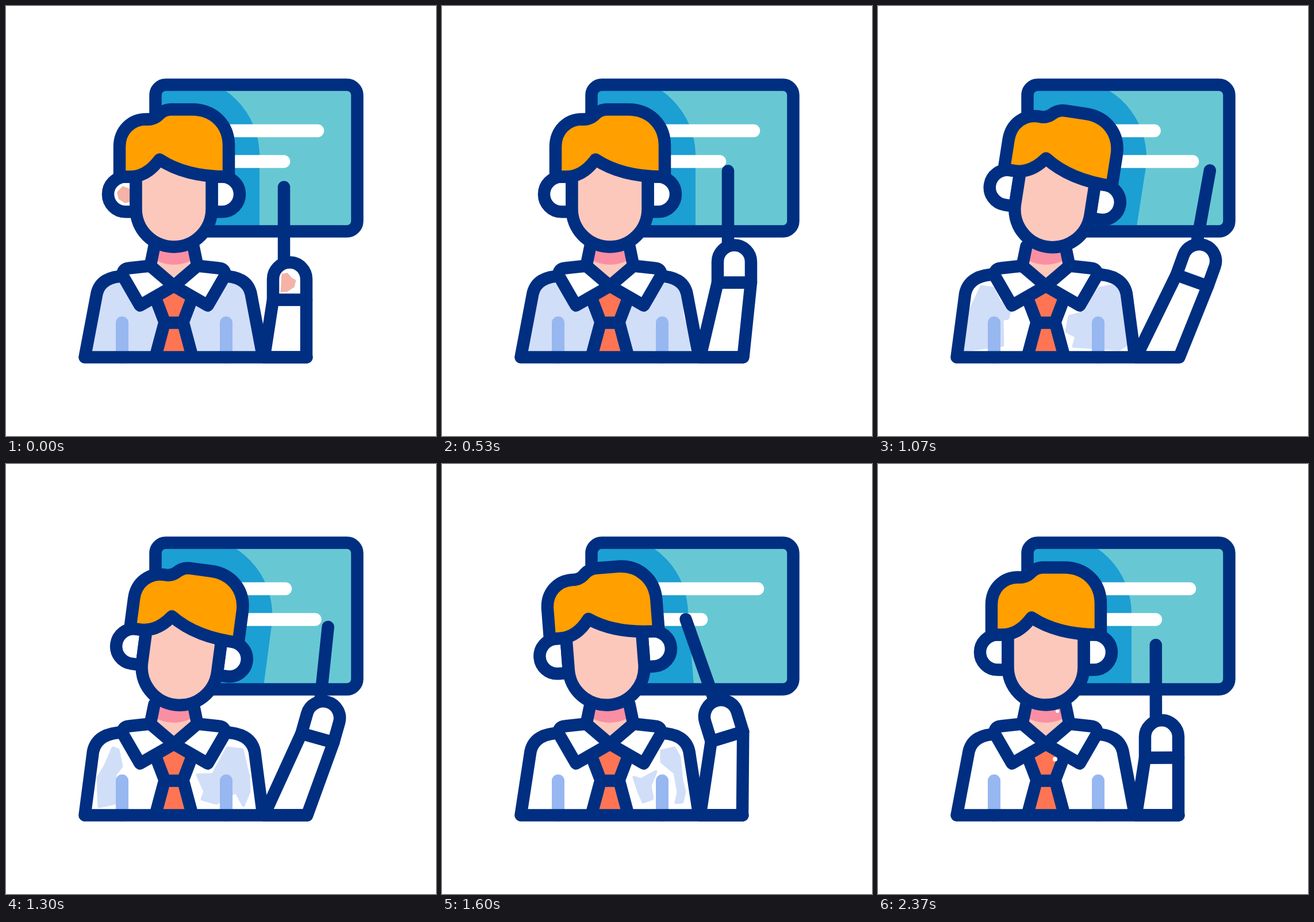
An HTML page that plays this animation: 748 by 748 pixels, repeating every 2.41 s.

```html
<!DOCTYPE html>
<html lang="en">
<head>
<meta charset="utf-8">
<title>Teacher at the board</title>
<style>
  html, body { margin: 0; width: 100%; height: 100%; overflow: hidden; background: #fff; }
  svg { display: block; width: 100vw; height: 100vh; }
  .ink { stroke: #002f81; stroke-width: 21.5; stroke-linecap: round; stroke-linejoin: round; fill: none; }
  .white { fill: #fff; }
  .skin { fill: #fdc8bc; }
  .hair { fill: #ff9f00; }
  .tie { fill: #ff7554; }
  .chalk { stroke: #fff; stroke-width: 22.5; stroke-linecap: round; }
  .fold { stroke: #97b7f1; stroke-width: 22; stroke-linecap: round; }
  #shirt { fill: #d1def8; stroke: #d1def8; stroke-width: 5; stroke-linejoin: round; }
  .blush { fill: #f4b3a6; }
</style>
</head>
<body>
<svg viewBox="0 0 748 748">
  <defs>
    <clipPath id="screen"><rect x="260" y="137" width="351" height="255"/></clipPath>
    <clipPath id="torso"><path d="M138 611L156 500Q164 470 207 470H377Q420 470 428 500L446 611Z"/></clipPath>
  </defs>

  <g id="board">
    <rect x="260" y="137" width="351" height="255" rx="18" fill="#67c8d4"/>
    <g clip-path="url(#screen)">
      <path class="sway" fill="#1c9fd3" d="M167 260A137 137 0 0 1 441 260V460H167Z"/>
    </g>
    <line id="row1" class="chalk" x1="310" y1="217" x2="542" y2="217"/>
    <line id="row2" class="chalk" x1="310" y1="270.5" x2="483" y2="270.5"/>
    <rect class="ink" x="260" y="137" width="351" height="255" rx="18"/>
  </g>

  <g id="arm">
    <line id="stick" class="ink"/>
    <path id="sleeve" class="ink white"/>
    <g id="hand">
      <path class="ink white" d="M-29 0V-36A29 29 0 0 1 29 -36V0Z"/>
      <path class="blush" d="M-14 -45L-4 -47L4 -38L11 -34L8 -22L-4 -14L-16 -13Z"/>
    </g>
  </g>

  <g id="body">
    <path class="skin" d="M268 400H316L326 455L292 475L258 455Z"/>
    <path fill="#fa8fa3" d="M266 415H318L322 443Q292 457 262 443Z"/>
    <path class="ink" d="M258 418L251 452M326 418L333 452"/>
    <g clip-path="url(#torso)"><path id="shirt"/></g>
    <path class="fold" d="M202 551V611M383 551V611"/>
    <path class="tie" d="M292 494L318 508L302 545H282L266 508ZM286 555H298L316 611H268Z"/>
    <path class="ink" d="M260 508L276 550L261 606M324 508L308 550L323 606M276 551H308"/>
    <path id="outline" class="ink"/>
    <path class="ink white" d="M203 469Q202 457 214 456L251 452L292 487L233 521ZM381 469Q382 457 370 456L333 452L292 487L351 521Z"/>
    <g id="specks" class="white"><circle cx="308" cy="513.5" r="4"/><circle cx="312" cy="430" r="3"/></g>
  </g>

  <g id="head" class="sway">
    <path class="ink white" d="M226 297H208A30.5 30.5 0 0 0 208 358H226ZM358 297H376A30.5 30.5 0 0 1 376 358H358Z"/>
    <path class="blush" d="M193 324L203 313L215 318V341L207 343L196 336Z"/>
    <path class="skin" d="M226 297L267 265L358 297V353A66 66 0 0 1 226 353Z"/>
    <path class="ink" d="M226 297V353A66 66 0 0 0 358 353V297"/>
    <path class="ink hair"
      d="M197.500 297V245C197.500 216 218 197 244 197Q256 198 264 191Q274 180 287 180H324C361 180 387.500 206 387.500 243V297Q314 298 267 267Q245 297 216 297Z"/>
  </g>
</svg>

<script>
const LOOP = 2410;
const $ = id => document.getElementById(id);

// Key times shared by every moving part, and its value at each
const KEYS = [0, 533, 1200, 1600, 2400];
const TRACKS = {
  tilt:  [0, 0, 9.8, -4.4],
  row1:  [542, 542, 474, 549],
  row2:  [483, 483, 554, 451],
  handX: [493.5, 508.5, 550.5, 496],
  handY: [511, 481, 477, 474],
  turn:  [0, 0, 22, -17],
  tipX:  [483.5, 497.5, 586, 424],
  tipY:  [315, 287, 286, 270],
  grip:  [-10, -11, -16, -3],
  baseX: [522.5, 524, 524, 522.5],
  swell: [0, 0, 7, 4]
};

// Shirt tint breaks away in hard steps
const TINTS = [
  [0, 'M130 460H455V615H130Z'],
  [270, 'M130 485H405L416 502L418 540L428 570L430 600L366 597L352 600H130Z'],
  [830, 'M180 488L200 491L212 515L230 527L226 543L216 545L217 590L150 599L160 530Z' +
        'M333 540L352 535L385 491L410 486L425 500L430 560L431 590L420 597L340 592L345 575L328 566Z'],
  [1270, 'M186 494L195 497L201 526L190 540V590L162 596L160 546L173 524Z' +
         'M333 541L360 540L385 494L411 497L422 545L423 570L413 594L400 570L366 590L341 583L346 570Z'],
  [1520, 'M382 499L404 494L413 510L417 550L422 570L418 588L407 589L411 570L405 537L382 518Z' +
         'M334 545L346 549L372 535L362 560L366 582L350 588L342 570Z'],
  [1800, '']
];

function pose(t) {
  let i = KEYS.findLastIndex(k => k <= t);
  if (i === KEYS.length - 1) { i--; t = KEYS[i + 1]; }
  const p = (t - KEYS[i]) / (KEYS[i + 1] - KEYS[i]);
  const e = p * p * (3 - 2 * p);
  const out = {};
  for (const [name, v] of Object.entries(TRACKS)) {
    out[name] = v[i] + (v[(i + 1) % v.length] - v[i]) * e;
  }
  return out;
}

function set(el, attrs) {
  for (const name in attrs) el.setAttribute(name, attrs[name]);
}

function setAll(selector, attrs) {
  for (const el of document.querySelectorAll(selector)) set(el, attrs);
}

// Both shoulders mirror around x = 292
function torso(swell) {
  const x = 158 - swell;
  const y = 470 - swell / 2;
  const side = at => `M${at(207)} ${y}Q${at(x + 7)} ${y} ${at(x)} 500L${at(137)} 611`;
  return side(v => v) + 'H523' + side(v => 584 - v);
}

function draw(t) {
  const s = pose(t);
  const a = s.turn * Math.PI / 180;
  const fromHand = (x, y) => [
    s.handX + x * Math.cos(a) - y * Math.sin(a),
    s.handY + x * Math.sin(a) + y * Math.cos(a)
  ];

  setAll('.sway', { transform: `rotate(${s.tilt} 293 430)` });
  set($('row1'), { x2: s.row1 });
  set($('row2'), { x2: s.row2 });

  const [gx, gy] = fromHand(s.grip, -70);
  set($('stick'), { x1: s.tipX, y1: s.tipY, x2: gx, y2: gy });
  set($('hand'), { transform: `translate(${s.handX} ${s.handY}) rotate(${s.turn})` });
  set($('sleeve'), { d: `M449 611L${fromHand(-29, 0)}L${fromHand(29, 0)}L${s.baseX} 611Z` });

  set($('outline'), { d: torso(s.swell) });
  set($('shirt'), { d: TINTS.findLast(([from]) => t >= from)[1] });
  setAll('.blush', { visibility: t < 130 ? 'visible' : 'hidden' });
  set($('specks'), { visibility: t >= 1800 ? 'visible' : 'hidden' });
}

const start = performance.now();
function tick() {
  draw((performance.now() - start) % LOOP);
  requestAnimationFrame(tick);
}
tick();
</script>
</body>
</html>
```
